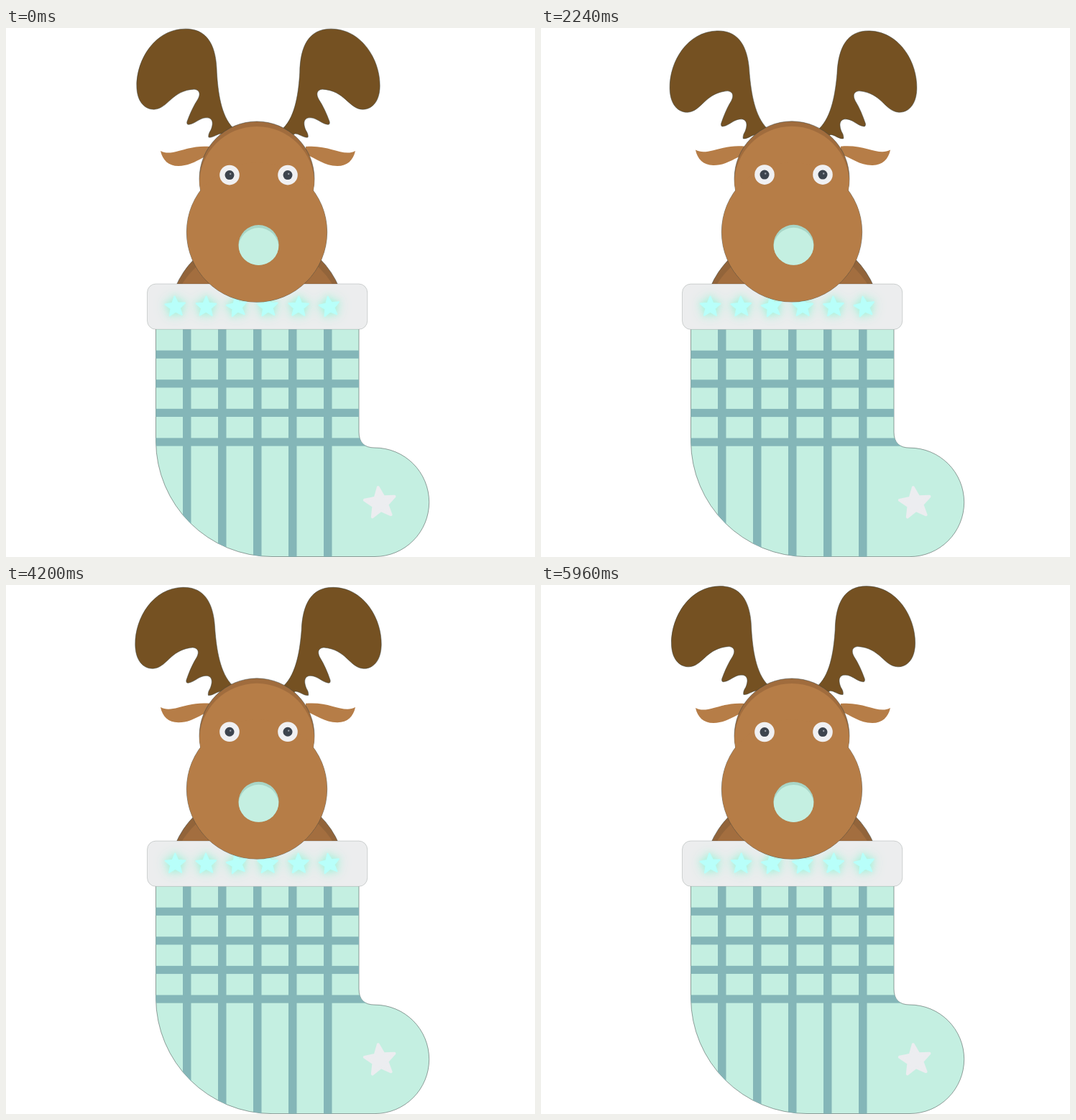
Write an HTML page that moves like this. It is 736 by 736 pixels and loops after 6 s.

```html
<!DOCTYPE html>
<html lang="en">
<head>
<meta charset="utf-8">
<title>Reindeer in a stocking</title>
<style>
  html, body { margin: 0; width: 100%; height: 100%; overflow: hidden; background: #fff; }
  svg { display: block; width: 100vw; height: 100vh; }
  .edge { stroke: #36413f; stroke-width: .5; }
  .fur { fill: #b67d47; }
  .mint { fill: #c4efe1; }
  .stripe { fill: #84b6b8; }
  .star { stroke-linejoin: round; }
  #lights .star { fill: #b8fffa; stroke: #b8fffa; stroke-width: 2; }
  #lights { filter: drop-shadow(0 0 4px #a9f3dc) drop-shadow(0 0 8px #b4f0dd); }
</style>
</head>
<body>
<svg viewBox="0 0 736 736">
  <defs>
    <path id="sock" d="M208.5 415H491V562Q491 584 513 584A75.75 75.75 0 0 1 513 735.5H370A161.5 161.5 0 0 1 208.5 575Z"/>
    <clipPath id="sockClip"><use href="#sock"/></clipPath>
    <clipPath id="skullClip"><circle cx="349" cy="210" r="80"/></clipPath>
    <clipPath id="noseClip"><circle cx="351.5" cy="302" r="28"/></clipPath>
    <clipPath id="bodyClip"><circle cx="349.5" cy="408.5" r="123.5"/></clipPath>
    <g id="antler">
      <path class="edge" fill="#755122" d="M316 139C299 122 295 88 293.5 62C293 25 281 1 250 1
        C208 1 182 43 182 80C182 101 192 113 206 113C226 112 230 87 262 85
        C270 86 271 92 267 99C261 108 256 119 252 130Q251 135 255 134
        C264 133 271 123 282 125C289 127 288 135 285 142Q281 148 282 152
        C288 153 294 147 300 147L320 160Z"/>
    </g>
    <g id="ear">
      <path class="fur" d="M215 171C232 180 250 162 284 165V176C270 181 258 192 240 192C226 192 218 184 215 171Z"/>
    </g>
  </defs>

  <g id="body">
    <circle class="edge" cx="349.5" cy="408.5" r="123.5" fill="#92643a"/>
    <circle cx="349.5" cy="422" r="123.5" fill="#a36e3f" clip-path="url(#bodyClip)"/>
  </g>

  <use id="antlerL" href="#antler"/>
  <use id="antlerR" href="#antler"/>
  <use id="earL" href="#ear"/>
  <use id="earR" href="#ear"/>

  <g id="stocking">
    <use href="#sock" class="mint edge"/>
    <g id="plaid" class="stripe" clip-path="url(#sockClip)"></g>
    <g id="toe"></g>
    <rect class="edge" stroke-opacity=".4" x="196.5" y="356" width="306.3" height="63.3" rx="12" fill="#ecedee"/>
    <g id="lights"></g>
  </g>

  <g id="head">
    <circle class="edge" cx="349" cy="210" r="80" fill="#a06c3d"/>
    <ellipse class="fur edge" cx="349" cy="284" rx="97.7" ry="97.3"/>
    <circle class="fur" cx="349" cy="217" r="80" clip-path="url(#skullClip)"/>
    <ellipse class="fur" cx="349" cy="284" rx="97.4" ry="97"/>
    <circle cx="351.5" cy="302" r="28" fill="#a8d6c7"/>
    <circle class="mint" cx="351.5" cy="306" r="28" clip-path="url(#noseClip)"/>
  </g>
  <g id="eyes"></g>
</svg>
<script>
  const $ = id => document.getElementById(id);

  function add(parent, tag, attrs) {
    const el = document.createElementNS('http://www.w3.org/2000/svg', tag);
    for (const key in attrs) el.setAttribute(key, attrs[key]);
    return parent.appendChild(el);
  }

  function starPoints(outer, inner) {
    return Array.from({ length: 10 }, (_, i) => {
      const r = i % 2 ? inner : outer, a = (i * 36 - 90) * Math.PI / 180;
      return `${(r * Math.cos(a)).toFixed(2)},${(r * Math.sin(a)).toFixed(2)}`;
    }).join(' ');
  }

  for (let i = 0; i < 5; i++)
    add($('plaid'), 'rect', { x: 246 + i * 49, y: 419, width: 11.5, height: 320 });
  for (let i = 0; i < 4; i++)
    add($('plaid'), 'rect', { x: 200, y: 448.6 + i * 40.6, width: 310, height: 11.2 });

  add($('toe'), 'polygon', {
    class: 'star', points: starPoints(22, 10), fill: '#ecedf0', stroke: '#ecedf0',
    'stroke-width': 4, transform: 'translate(520.5 661) rotate(-7)'
  });

  const lights = Array.from({ length: 6 }, () =>
    add($('lights'), 'polygon', { class: 'star', points: starPoints(14.5, 6.5) }));

  for (const cx of [311, 392]) {
    add($('eyes'), 'circle', { cx, cy: 204.6, r: 13.8, fill: '#f0f0f2' });
    add($('eyes'), 'circle', { cx, cy: 204.6, r: 6.5, fill: '#3d444e' });
    add($('eyes'), 'circle', { cx: cx + 1.2, cy: 203, r: 1.2, fill: '#9a9fa8' });
  }

  const PERIOD = 2000, LAG = 20;
  const place = (id, transform) => $(id).setAttribute('transform', transform);
  const mirror = axis => `translate(${2 * axis} 0) scale(-1 1) `;

  function draw(ms) {
    const phase = (ms - LAG + PERIOD) % PERIOD / PERIOD;
    const linear = 1 - Math.abs(1 - 2 * phase);
    const sine = (1 - Math.cos(2 * Math.PI * phase)) / 2;
    const lift = -1.8 * sine;

    const antler = `rotate(${-10.4 * (linear + sine) / 2} 345 175)`;
    place('antlerL', antler);
    place('antlerR', mirror(351) + antler);

    const ear = `translate(0 ${lift}) rotate(${8.8 * sine} 284 167)`;
    place('earL', ear);
    place('earR', mirror(350.5) + ear);

    place('head', `translate(0 ${lift})`);
    place('eyes', `translate(0 ${-4.4 * sine})`);
    place('stocking', `translate(0 ${sine})`);
    place('body', `translate(349.5 408.5) scale(${1 + .005 * sine}) translate(-349.5 -408.5)`);

    lights.forEach((star, i) => {
      const tilt = -4 + 6 * Math.sin(2 * Math.PI * ms / PERIOD + i * 2.1);
      star.setAttribute('transform', `translate(${235.5 + i * 42.9} 388) rotate(${tilt})`);
    });
  }

  const start = performance.now();
  function tick() {
    draw((performance.now() - start) % 6000);
    requestAnimationFrame(tick);
  }
  draw(0);
  requestAnimationFrame(tick);
</script>
</body>
</html>
```
